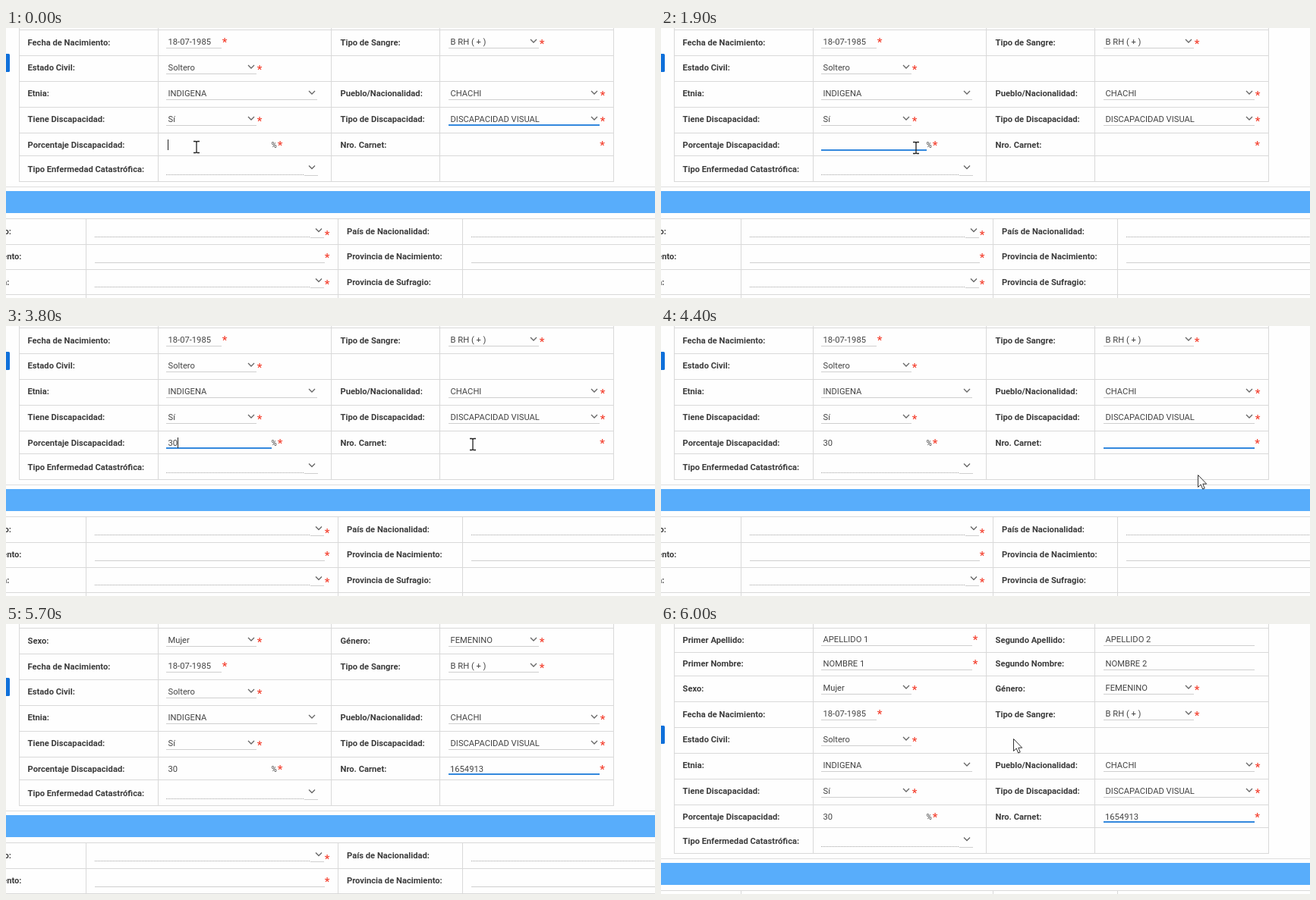
Write an HTML page that moves like this. It is 855x356 px and loops after 6.1 s.

```html
<!DOCTYPE html>
<html lang="es">
<head>
<meta charset="utf-8">
<title>Formulario</title>
<style>
html, body { margin: 0; width: 100%; height: 100%; overflow: hidden; background: #fefefe; }
svg { display: block; width: 855px; height: 356px; }
text { font: 11.2px Roboto, Arial, sans-serif; fill: #444; white-space: pre; }
.label { font-weight: 700; fill: #3c3c3c; }
.star { font-size: 15px; font-weight: 500; fill: #f4402f; text-anchor: middle; }
.end { text-anchor: end; }
.chevron { fill: none; stroke: #666; stroke-width: 1.3; }
.dots { stroke: #a2a2a2; stroke-width: 1; stroke-dasharray: 1 1; }
</style>
</head>
<body>
<svg id="stage" viewBox="0 0 855 356">
  <g id="page"></g>
  <g id="arrow"><path d="M.5 .5V16.5L4.2 13L6.7 19L9.2 18L6.8 12.2H11.7Z" fill="#fff" stroke="#333"/></g>
  <g id="beam"><path d="M-4 -7.5H-1L0 -6.5L1 -7.5H4M0 -6.5V6.5M-4 7.5H-1L0 6.5L1 7.5H4" fill="none" stroke="#222" stroke-width="1.3"/></g>
</svg>
<script>
const LOOP = 6100, STEP = 100;
const GRID = '#d9d9d9', RULE = '#cfcfcf', FOCUS = '#3388dd';
const page = document.getElementById('page');
const arrow = document.getElementById('arrow');
const beam = document.getElementById('beam');

function add(tag, attrs, content) {
  const el = document.createElementNS('http://www.w3.org/2000/svg', tag);
  for (const k in attrs) el.setAttribute(k, attrs[k]);
  if (content) el.textContent = content;
  return page.appendChild(el);
}
const box = (x, y, width, height, fill) => add('rect', { x, y, width, height, fill });
const hline = (x1, x2, y, color = RULE) => box(x1, y, x2 - x1, 1, color);
const vline = (x, y1, y2) => box(x, y1, 1, y2 - y1, GRID);
const text = (x, mid, str, cls = '') => add('text', { x, y: mid + 4, class: cls }, str);
const label = (x, mid, str, cls = '') => text(x, mid, str, 'label ' + cls);
const star = (x, mid) => text(x, mid + 3.5, '*', 'star');
const chevron = (x, y) => add('path', { d: `M${x - 4} ${y - 2}l4 4l4 -4`, class: 'chevron' });

function dotted(x1, x2, y, tail = 0) {
  add('path', { d: `M${x1} ${y + .5}H${x2}`, class: 'dots' });
  if (tail) hline(x2, x2 + tail, y + 1);
}

// Drop-down: value, arrow and rule, around the middle of its row
function select(x, width, mid, str, required = true) {
  text(x + 2.5, mid - .5, str);
  chevron(x + width - 7, mid - 1);
  hline(x, x + width, mid + 8);
  if (required) star(x + width + 4, mid + .8);
}

function input(x, width, mid, str, required) {
  text(x + 2.5, mid, str);
  hline(x, x + width, mid + 8);
  if (required) star(x + width + 4, mid - 1.8);
}

const L1 = 28.5, F1 = 211, L2 = 440.5, F2 = 583;

function personTable() {
  for (const y of [-95, -63, -32, 2, 36, 70, 104, 138, 168, 202]) hline(17, 801, y, GRID);
  for (const x of [17, 200, 428, 571, 800]) vline(x, -140, 203);

  const rows = [
    [-79.5, 'Primer Apellido:', 'Segundo Apellido:'],
    [-48, 'Primer Nombre:', 'Segundo Nombre:'],
    [-15.5, 'Sexo:', 'Género:'],
    [18.5, 'Fecha de Nacimiento:', 'Tipo de Sangre:'],
    [52, 'Estado Civil:'],
    [86, 'Etnia:', 'Pueblo/Nacionalidad:'],
    [120, 'Tiene Discapacidad:', 'Tipo de Discapacidad:'],
    [153.5, 'Porcentaje Discapacidad:', 'Nro. Carnet:'],
    [185.5, 'Tipo Enfermedad Catastrófica:']
  ];
  for (const [mid, left, right] of rows) {
    label(L1, mid, left);
    if (right) label(L2, mid, right);
  }

  input(F1, 199, -80, 'APELLIDO 1', true);
  input(F2, 199, -80, 'APELLIDO 2');
  input(F1, 199, -48, 'NOMBRE 1', true);
  input(F2, 199, -48, 'NOMBRE 2');
  select(F1, 119, -16, 'Mujer');
  select(F2, 119, -16, 'FEMENINO');
  input(F1, 73, 18, '18-07-1985', true);
  select(F2, 119, 18, 'B RH ( + )');
  select(F1, 119, 52, 'Soltero');
  select(F1, 199, 86, 'INDIGENA', false);
  select(F2, 199, 86, 'CHACHI');
  select(F1, 119, 120, 'Sí');
  select(F2, 199, 120, 'DISCAPACIDAD VISUAL');
  text(349.5, 153.5, '%').style.fontSize = '10px';
  star(361, 152);
  star(785.5, 152);
  chevron(403, 183.5);
  dotted(F1, 393, 193, 18);
}

function birthTable() {
  hline(0, 855, 209, '#dedede');
  box(0, 215, 855, 29, '#58adfb');
  for (const y of [251, 285, 318, 351]) hline(0, 855, y, GRID);
  for (const x of [105, 437, 601]) vline(x, 251, 400);

  label(7, 268, 'o:', 'end');
  label(20.5, 301, 'ento:', 'end');
  label(4.5, 334.5, 'a:', 'end');
  label(449, 268, 'País de Nacionalidad:');
  label(449, 301, 'Provincia de Nacimiento:');
  label(449, 334.5, 'Provincia de Sufragio:');

  dotted(117, 401, 275, 18);
  hline(117, 420, 309);
  dotted(117, 401, 341, 18);
  dotted(613, 855, 275);
  hline(613, 855, 309);
  chevron(412, 266.5);
  chevron(412, 332.5);
  star(423, 270);
  star(423, 300);
  star(423, 335.5);
}

personTable();
birthTable();
add('rect', { x: -6, y: 34, width: 11, height: 24, rx: 1.5, fill: '#0f70da' });

const focusBar = y => box(0, y, 0, 2, FOCUS);
const kindBar = focusBar(127), percentBar = focusBar(160), cardBar = focusBar(160);
const percent = text(213.5, 153.5, ''), card = text(585, 153.5, '');
const caret = box(0, 147, 1, 14, '#222');

// Pointer poses: time, x, y, shape; each holds until the next
const POSES = [
  [0, 251, 157, beam], [1700, 268, 157, beam], [1800, 312, 157, beam], [1900, 336, 158, beam],
  [2000, 344, 140, beam], [2100, 352, 104, arrow], [2200, 357, 72, arrow], [2300, 358, 58, arrow],
  [3300, 386, 60, arrow], [3400, 445, 77, arrow], [3500, 524, 174, arrow],
  [3600, 585, 174, arrow], [3700, 610, 160, beam], [3800, 615, 156, beam],
  [4200, 630, 160, beam], [4300, 680, 184, arrow], [4400, 707, 196, arrow],
  [5600, 0, 0, null], [6000, 464, 151, arrow]
];
const SCROLL = { 5700: 37, 5800: 86, 5900: 100, 6000: 100 };

const ease = (t, start) => {
  const p = Math.min(1, Math.max(0, (t - start) / 300));
  return 1 - (1 - p) ** 3;
};

// Focus rule that opens and closes from its centre
function stretch(bar, x, width, k) {
  bar.setAttribute('x', x + width * (1 - k) / 2);
  bar.setAttribute('width', width * k);
}

function place(el, x, y) {
  el.setAttribute('transform', `translate(${x} ${y})`);
}

function caretX(t, typed) {
  if (t < 2400) return t % 1000 < 500 ? 213 : null;
  if (t < 3200) return 213.5 + percent.textContent.length * 6.3;
  if (t < 3700) return null;
  if (t < 3900) return 226;
  if (t < 4400) return 585;
  if (t >= 4700 && t < 5600) return 585 + typed * 6.3;
  return null;
}

function draw(now) {
  const t = Math.floor(now % LOOP / STEP) * STEP;
  place(page, 0, SCROLL[t] || 0);

  stretch(kindBar, F2, 199, 1 - ease(t, 0));
  stretch(percentBar, F1, 139, ease(t, 0) - ease(t, 3800));
  stretch(cardBar, F2, 199, ease(t, 3800));

  const typed = t < 4700 ? 0 : t < 5200 ? (t - 4600) / 100 : 7;
  percent.textContent = t < 2400 ? '' : t < 2600 ? '3' : '30';
  card.textContent = '1654913'.slice(0, typed);

  const cx = caretX(t, typed);
  caret.style.display = cx === null ? 'none' : '';
  if (cx !== null) caret.setAttribute('x', Math.round(cx));

  const [, x, y, shape] = POSES.filter(p => p[0] <= t).pop();
  for (const el of [arrow, beam]) el.style.display = el === shape ? '' : 'none';
  if (shape) place(shape, x, y);
}

const begin = performance.now();
function tick() {
  draw(performance.now() - begin);
  requestAnimationFrame(tick);
}
tick();
</script>
</body>
</html>
```
